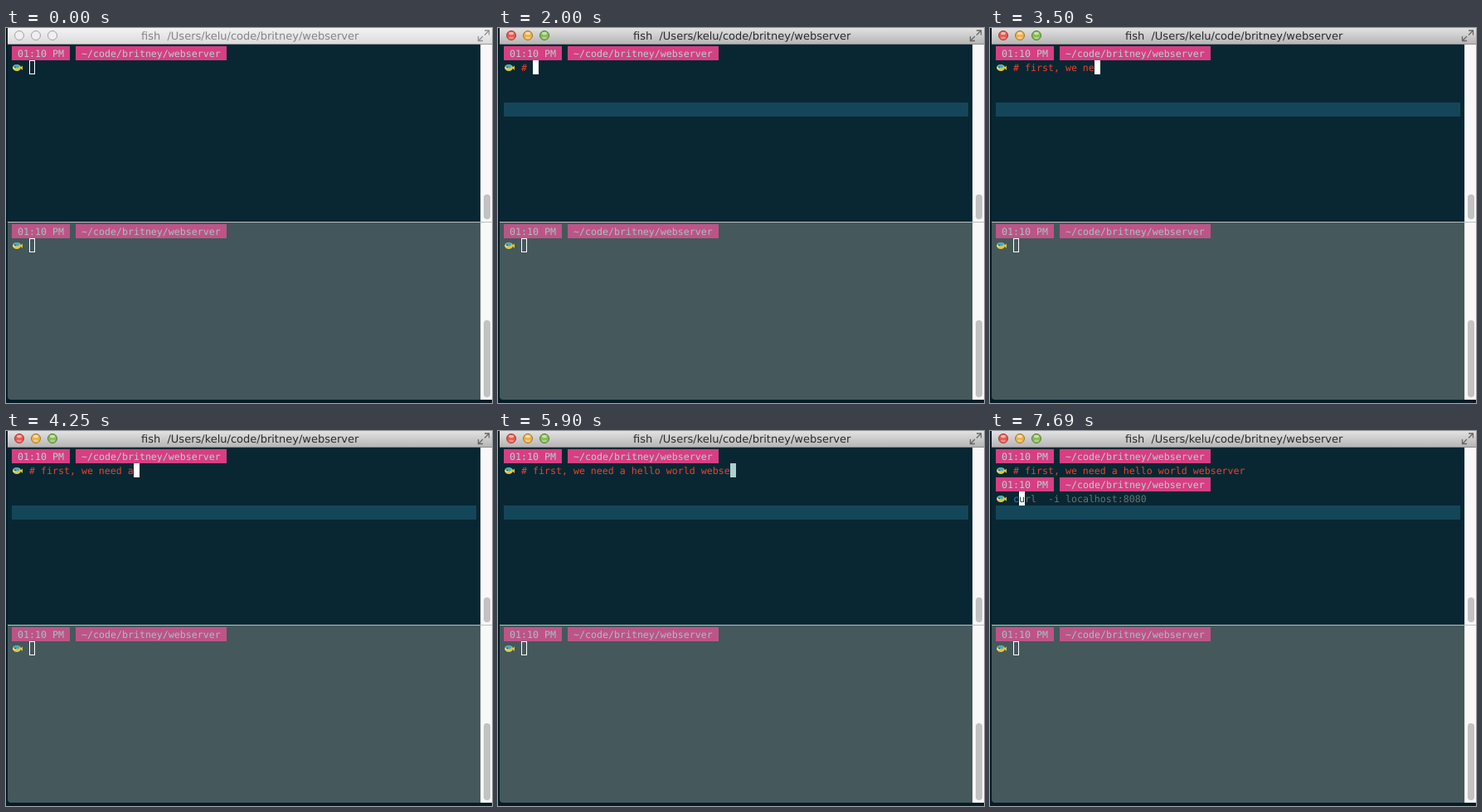
An HTML page for the animation above (8 s loop, 586 by 453 pixels).

```html
<!DOCTYPE html>
<html lang="en">
<head>
<meta charset="utf-8">
<title>Split terminal</title>
<style>
  html, body { margin: 0; width: 100%; height: 100%; overflow: hidden; background: #031c27; }
  svg { display: block; width: 586px; height: 453px; }
  text { white-space: pre; text-rendering: geometricPrecision; }
  .mono { font: 11.627px "DejaVu Sans Mono", monospace; }
  .title { font: 13px "DejaVu Sans", sans-serif; fill: #2b2b2b; }
  .top { --pink: #d63f83; --label: #b4d2ce; }
  .bottom { --pink: #bd5488; --label: #a9c0bc; }
  .comment { fill: #f0402f; }
  .hint { fill: #667476; }
  .knob { fill: #c2c2c2; }
  .inactive .title { fill: #858585; }
  .inactive .bar { fill: url(#barOff); }
  .inactive .light { fill: #efefef; stroke: #a2a2a2; }
  .inactive .shine { display: none; }
  .inactive .pane { fill: #42565b; }
  .inactive .expand { stroke: #929292; }
</style>
</head>
<body>
<svg id="stage" viewBox="0 0 586 453">
  <defs>
    <linearGradient id="barOn" x2="0" y2="1">
      <stop stop-color="#e2e2e2"/><stop offset="1" stop-color="#b4b4b4"/>
    </linearGradient>
    <linearGradient id="barOff" x2="0" y2="1">
      <stop stop-color="#f3f3f3"/><stop offset="1" stop-color="#dadada"/>
    </linearGradient>
    <g id="fish">
      <path d="M10 6 L13 3.5 V9 Z" fill="#e3c63c"/>
      <ellipse cx="6" cy="6" rx="5" ry="4" fill="#dfc93d"/>
      <path d="M2 4.5 Q5 0 9.5 4 L8 6.5 L3.5 6 Z" fill="#43a9c4"/>
      <path d="M1 6 L3.5 5 L4 8 Z" fill="#f0e8a0"/>
      <circle cx="4" cy="5.5" r=".8" fill="#173039"/>
    </g>
    <g id="prompt">
      <path d="M0 0h70v17h-70z M77 0h182v17h-182z" style="fill:var(--pink)"/>
      <text class="mono" x="7" y="13" style="fill:var(--label)">01:10 PM</text>
      <text class="mono" x="84" y="13" style="fill:var(--label)">~/code/britney/webserver</text>
      <use href="#fish" y="20"/>
    </g>
  </defs>

  <path d="M2 20H586V235H2Z" fill="#082732"/>
  <path class="pane" d="M2 235H586V449H6Q2 449 2 445Z" fill="#45585c"/>
  <path d="M572 20h14v429h-14z" fill="#f8f8f8"/>
  <path d="M572.5 20v429" stroke="#e6e6e6"/>
  <path d="M2 234.5h584" stroke="#b9c0c1"/>
  <rect class="knob" x="576" y="201" width="8" height="30" rx="4"/>
  <rect class="knob" x="576" y="353" width="8" height="93" rx="4"/>

  <rect class="bar" x="2" width="584" height="20" fill="url(#barOn)"/>
  <path d="M2 19.5h584" stroke="#777" opacity=".65"/>
  <g id="lights"></g>
  <text class="title" x="163" y="14">fish  /Users/kelu/code/britney/webserver</text>
  <g class="expand" fill="none" stroke="#666" stroke-width="1.3">
    <path d="M577 3h5.5v5.5M582 3.5l-5 5M575 15.500h-5.500v-5.500M570 15l5-5"/>
  </g>

  <g class="top">
    <rect id="guide" x="7" y="90" width="560" height="17" fill="#14465a"/>
    <use href="#prompt" x="7" y="22"/>
    <use id="nextPrompt" href="#prompt" x="7" y="56"/>
    <rect id="caret" width="7" height="17"/>
    <rect id="hollow" x="28.500" y="39.500" width="6" height="16" fill="none" stroke="#fff"/>
    <text id="typed" class="mono comment" x="28" y="52"></text>
    <text id="command" class="mono hint" x="28" y="86"><tspan fill="#2b7fc0">c</tspan><tspan fill="#26383e">u</tspan>rl  -i localhost:8080</text>
  </g>
  <g class="bottom">
    <use href="#prompt" x="7" y="237"/>
    <rect x="28.500" y="254.500" width="6" height="16" fill="none" stroke="#fff"/>
  </g>
  <g id="pointer" fill="none">
    <path id="beam" d="M512 102.500q3.500 0 3.500 2.500V115q0 2.500 -3.500 2.500M519 102.500q-3.500 0 -3.500 2.500V115q0 2.500 3.500 2.500M513.500 112.500h4" stroke="#e8eeee"/>
  </g>
</svg>
<script>
const LOOP = 8000, CELL = 7, LEFT = 28;
const COMMENT = "# first, we need a hello world webserver";

// [time in ms, characters typed]
const KEYS = [
  [0, 0], [1550, 1],
  [2000, 2], [2150, 3], [2300, 4], [2450, 5], [2600, 7], [2750, 8], [2900, 9],
  [3050, 10], [3200, 11], [3350, 12], [3500, 14], [3650, 15], [3800, 16],
  [4100, 17], [4250, 18], [4400, 19], [4550, 20], [4700, 22], [4850, 23], [5000, 25],
  [5150, 28], [5450, 30], [5600, 32], [5750, 34], [5900, 36], [6050, 38], [6200, 39], [6340, 40]
];
const FOCUS = 500, GUIDE = 950, ENTER = 6640, COMMAND = 7690;

const $ = id => document.getElementById(id);
const show = (id, on) => $(id).setAttribute("visibility", on ? "visible" : "hidden");
const within = (t, from, to) => t >= from && t < to;

$("lights").innerHTML = [["#e8594f", "#a33a33"], ["#edb04a", "#a0752b"], ["#86bd55", "#527f31"]]
  .map(([fill, edge], i) => {
    const x = 16 + 20 * i;
    return `<circle class="light" cx="${x}" cy="9" r="5.5" fill="${fill}" stroke="${edge}"/>
      <ellipse class="shine" cx="${x}" cy="6.500" rx="3" ry="1.800" fill="#fff" opacity=".55"/>
      <ellipse class="shine" cx="${x}" cy="12" rx="3" ry="1.500" fill="#fff" opacity=".3"/>`;
  }).join("");

function render(t) {
  const count = KEYS.findLast(([at]) => at <= t)[1];
  const entered = t >= ENTER, hinted = t >= COMMAND;
  const column = entered ? Number(hinted) : count;

  $("stage").classList.toggle("inactive", t < FOCUS);
  show("hollow", t < FOCUS);
  show("caret", t >= FOCUS);
  show("pointer", within(t, 650, 1100));
  show("guide", t >= GUIDE);
  show("nextPrompt", entered);
  show("command", hinted);

  $("typed").textContent = COMMENT.slice(0, count);
  $("caret").setAttribute("x", LEFT + column * CELL);
  $("caret").setAttribute("y", entered ? 73 : 39);
  $("caret").setAttribute("fill", within(t, 5900, 6050) ? "#abd0ce" : "#fff");
}

const start = performance.now();
function tick() {
  render((performance.now() - start) % LOOP);
  requestAnimationFrame(tick);
}
tick();
</script>
</body>
</html>
```
